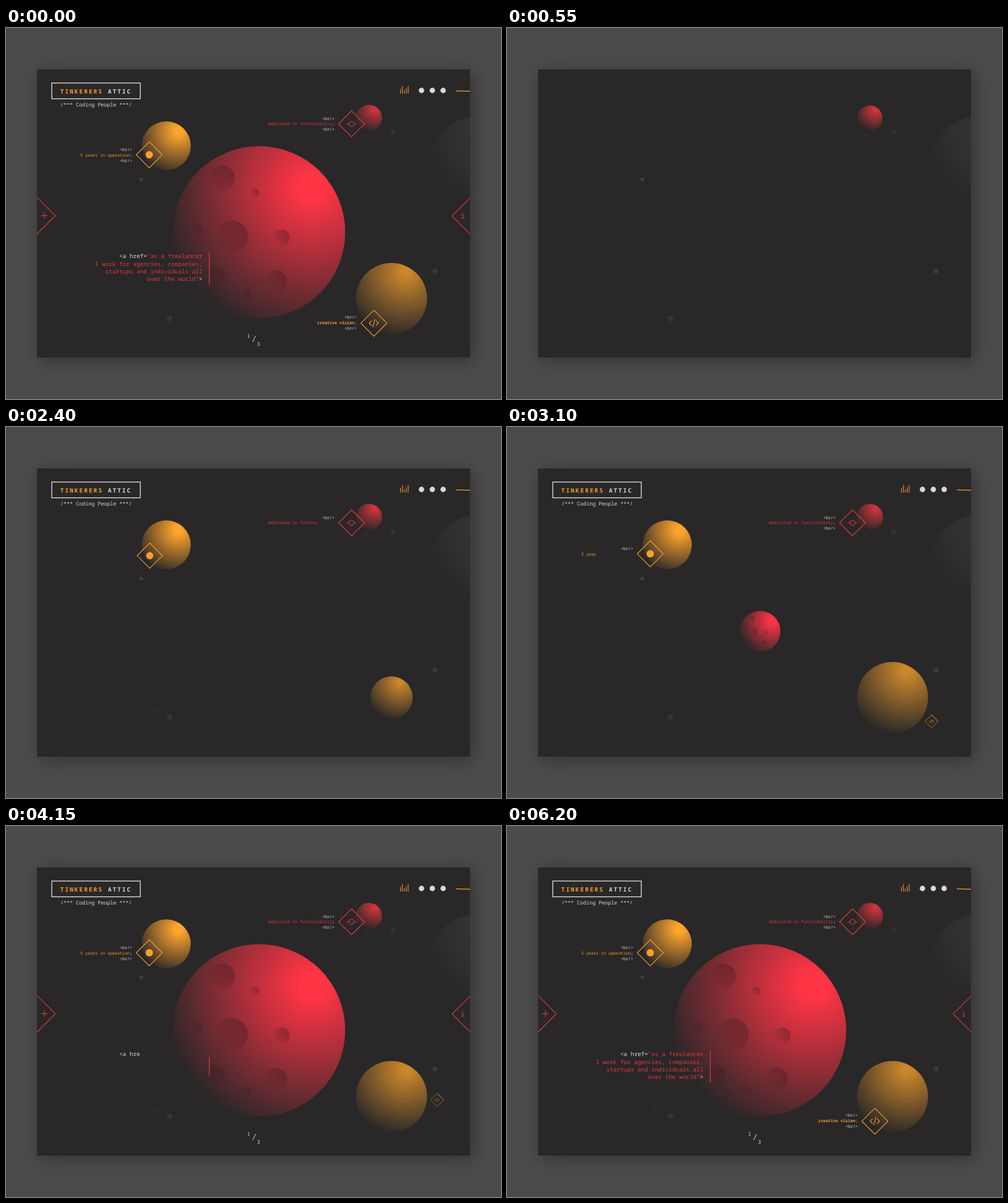
Recreate the animation shown at these times as an HTML page with a canvas. Size 800 px wide and 600 px high, loop 6.55 s.

```html
<!DOCTYPE html>
<html lang="en">
<head>
<meta charset="utf-8">
<style>
  html, body { margin: 0; width: 100%; height: 100%; overflow: hidden; background: #4c4a4b; }
  canvas { display: block; }
</style>
</head>
<body>
<canvas id="stage" width="800" height="600"></canvas>
<script>
const ctx = document.getElementById('stage').getContext('2d');
const LOOP = 6550, STEP = 50, END = 6200;
const CARD = '#292728', LIGHT = '#d9d8d8', ORANGE = '#f9a02c', RED = '#e2383f';
const MONO = '"Noto Sans Mono", "DejaVu Sans Mono", monospace';
const TAU = Math.PI * 2;

const clamp = v => Math.max(0, Math.min(1, v));
const mix = (a, b, k) => a + (b - a) * k;
const easeOut = (t, start, length, power = 3) => 1 - (1 - clamp((t - start) / length)) ** power;

function line(color, width, ...points) {
  ctx.beginPath();
  points.forEach(([x, y]) => ctx.lineTo(x, y));
  ctx.strokeStyle = color;
  ctx.lineWidth = width;
  ctx.stroke();
}

function disc(x, y, r, fill) {
  ctx.beginPath();
  ctx.arc(x, y, r, 0, TAU);
  ctx.fillStyle = fill;
  ctx.fill();
}

function text(str, x, y, size, color, weight = 400, spacing = 0) {
  ctx.font = `${weight} ${size}px ${MONO}`;
  ctx.letterSpacing = spacing + 'px';
  ctx.fillStyle = color;
  ctx.fillText(str, x, y);
}

// Types pieces [x, y, string, color, weight] one after another.
function type(t, start, perChar, size, pieces) {
  let left = Math.floor((t - start) / perChar);
  for (const [x, y, str, color, weight] of pieces) {
    if (left <= 0) return;
    text(str.slice(0, left), x, y, size, color, weight);
    left -= str.length;
  }
}

function label(t, start, right, y, str, color, weight) {
  const width = 4, x = right - (str.length + 1) * width;
  type(t, start, 25, 6.667, [
    [right - 5 * width, y - 8.7, '<br/>', LIGHT],
    [x, y, str, color, weight],
    [right - width, y, ';', LIGHT],
    [right - 5 * width, y + 8.7, '<br/>', LIGHT]
  ]);
}

// Unit sphere lit from (lx, ly), falling off into the card colour.
function planet(x, y, r, scale, color, lx, ly, from, to, details) {
  if (scale <= 0) return;
  ctx.save();
  ctx.translate(x, y);
  ctx.scale(r * scale, r * scale);
  const glow = ctx.createRadialGradient(lx, ly, from, lx, ly, to);
  glow.addColorStop(0, color);
  glow.addColorStop(1, CARD);
  disc(0, 0, 1, glow);
  if (details) {
    ctx.scale(1 / r, 1 / r);
    details();
  }
  ctx.restore();
}

function crater(x, y, r) {
  const shade = ctx.createLinearGradient(x + r * .8, y - r * .6, x - r * .75, y + r * .55);
  shade.addColorStop(0, 'rgba(60,25,32,.38)');
  shade.addColorStop(1, 'rgba(60,25,32,0)');
  disc(x, y, r, shade);
}

function craters() {
  [[-60, -87, 21], [-7, -63, 7], [-101, -4, 9], [-44, 7, 26], [36, 9, 13.5],
   [-72, 72, 16], [27, 79, 18], [-21, 100, 8]].forEach(c => crater(...c));
}

const icons = {
  commit(color, w) {
    ctx.beginPath();
    ctx.arc(0, 0, 4, 0, TAU);
    ctx.strokeStyle = color;
    ctx.lineWidth = w;
    ctx.stroke();
    line(color, w, [-8, 0], [-4, 0]);
    line(color, w, [4, 0], [8, 0]);
  },
  dot(color) { disc(0, 0, 6, color); },
  code(color, w) {
    line(color, w, [-3.5, -4], [-7.5, 0], [-3.5, 4]);
    line(color, w, [3.5, -4], [7.5, 0], [3.5, 4]);
    line(color, w, [1.8, -6.5], [-1.8, 6.5]);
  }
};

// Diamond badge at a polar position around a planet centre.
function badge(cx, cy, angle, radius, scale, alpha, color, icon) {
  if (scale <= 0) return;
  const a = angle * Math.PI / 180, w = 1.1 / Math.sqrt(scale);
  ctx.save();
  ctx.globalAlpha = alpha;
  ctx.translate(cx + radius * Math.cos(a), cy + radius * Math.sin(a));
  ctx.scale(scale, scale);
  line(color, w, [0, -21], [21, 0], [0, 21], [-21, 0], [0, -21], [21, 0]);
  icon(color, w);
  ctx.restore();
}

function spiralBadge(t, start, cx, cy, angle, radius, farRadius, color, icon) {
  const k = easeOut(t, start, 500);
  badge(cx, cy, mix(-48, angle, k), mix(farRadius, radius, k), k, .6 + .4 * k, color, icon);
}

// Circles at a small scale first, then settles in front.
function orbitBadge(t, cx, cy, color, icon) {
  const k = easeOut(t, 4150, 850, 2);
  const angle = t < 4150 ? 31.4 + (t - 3100) * .317 : mix(364.2, 485.5, k);
  const scale = t < 4150 ? .5 * easeOut(t, 2800, 250) : mix(.5, 1, k);
  const alpha = t < 4150 ? mix(.85, .65, clamp((t - 3100) / 1050)) : mix(.65, 1, k);
  badge(cx, cy, angle, mix(74, 49.1, k), scale, alpha, color, icon);
}

function backdrop() {
  const haze = ctx.createRadialGradient(800, 165, 10, 800, 165, 128);
  haze.addColorStop(0, '#383738');
  haze.addColorStop(.5, '#323132');
  haze.addColorStop(1, CARD);
  disc(762, 222, 79, haze);
  [[218, 245.5, 3.5, '#484748'], [240, 250, 2, '#383738'], [581, 175, 4, '#302e2f'],
   [624, 170, 6, '#333132'], [692.5, 394, 5, '#403f40'], [240, 460, 2.5, '#373637'],
   [263.5, 470.5, 5.5, '#3a393a']].forEach(([x, y, r, color]) =>
    planet(x, y, r, 1, color, .3, -.3, .2, 1.45));
}

function header(t) {
  const k = easeOut(t, 700, 500);
  ctx.save();
  ctx.translate(-170 * (1 - k), 0);
  ctx.strokeStyle = '#e2e1e1';
  ctx.lineWidth = 1.3;
  ctx.strokeRect(74, 89, 143, 25.5);
  text('TINKERERS', 87.7, 106, 9.5, ORANGE, 700, 2);
  text('ATTIC', 164.7, 106, 9.5, LIGHT, 600, 2);
  ctx.restore();

  ctx.save();
  ctx.translate(120 * (1 - k), 0);
  [7.5, 12, 5, 8.5, 12].forEach((h, i) =>
    line(ORANGE, 1, [637.6 + i * 3.1, 106], [637.6 + i * 3.1, 106 - h]));
  [671.5, 689, 706.5].forEach(x => disc(x, 101, 4.4, LIGHT));
  line(ORANGE, 1.2, [727, 101.7], [752, 102.4]);
  ctx.restore();

  type(t, 1290, 25, 8.37, [[88, 126.5, '/*** Coding People ***/', LIGHT]]);
}

function sideButtons(t) {
  const shift = 32 * (1 - easeOut(t, 3250, 500));
  ctx.save();
  ctx.translate(-shift, 0);
  line(RED, 1.1, [49, 273], [79.7, 303.7], [49, 334.4]);
  line(RED, 1.1, [57, 303.5], [67, 303.5]);
  line(RED, 1.1, [62, 298.5], [62, 308.5]);
  ctx.translate(2 * shift, 0);
  line(RED, 1.1, [751, 274], [721, 304], [751, 334]);
  text('i', 734.6, 307.7, 12, RED, 500);
  ctx.restore();
}

function pager(t) {
  const k = easeOut(t, 3250, 400);
  ctx.save();
  ctx.globalAlpha = k;
  ctx.translate(0, 7 * (1 - k));
  text('1', 389.4, 501, 8.4, LIGHT);
  line(LIGHT, 1, [403.5, 498], [398.5, 508]);
  text('3', 405.4, 514, 8.4, LIGHT);
  ctx.restore();
}

function quote(t) {
  const half = 26 * easeOut(t, 4020, 500, 2.9);
  if (half > 0) line(RED, 1.2, [328.5, 389 - half], [328.5, 389 + half]);
  type(t, 4030, 20, 9.333, [
    [183, 372.4, '<a href=', LIGHT],
    [227.8, 372.4, '"as a freelancer', RED],
    [143.8, 384.5, 'I work for agencies, companies,', RED],
    [160.6, 396.6, 'startups and individuals all', RED],
    [227.8, 408.7, 'over the world"', RED],
    [311.8, 408.7, '>', LIGHT]
  ]);
}

function draw(t) {
  ctx.fillStyle = '#4c4a4b';
  ctx.fillRect(0, 0, 800, 600);
  ctx.save();
  ctx.shadowColor = 'rgba(0,0,0,.32)';
  ctx.shadowBlur = 26;
  ctx.shadowOffsetX = 5;
  ctx.shadowOffsetY = 5;
  ctx.fillStyle = CARD;
  ctx.fillRect(50, 67, 700, 466);
  ctx.restore();

  ctx.save();
  ctx.beginPath();
  ctx.rect(50, 67, 700, 466);
  ctx.clip();
  ctx.textRendering = 'geometricPrecision';

  backdrop();
  planet(586.5, 145.5, 21.3, easeOut(t, 100, 700), '#cf353b', .45, -.65, .1, 1.75);
  planet(259, 190.5, 39.6, easeOut(t, 1250, 500), '#ffa52d', .5, -.6, .15, 1.85);
  planet(623, 437.5, 57.5, easeOut(t, 2270, 500), '#cb872b', .4, -.75, .1, 1.85);
  planet(409, 330.3, 139.2, easeOut(t, 3057, 500), '#ff3445', .62, -.52, .15, 1.78, craters);

  header(t);
  spiralBadge(t, 1150, 586.5, 145.5, 161.3, 29.6, 66, RED, icons.commit);
  spiralBadge(t, 2050, 259, 190.5, 152, 31.1, 60, ORANGE, icons.dot);
  orbitBadge(t, 623, 437.5, ORANGE, icons.code);
  label(t, 1770, 531, 157.2, 'dedicated to functionality', RED);
  label(t, 2820, 204, 207.9, '5 years in operation', ORANGE);
  label(t, 5050, 567, 479.1, 'creative vision', ORANGE, 700);
  sideButtons(t);
  pager(t);
  quote(t);
  ctx.restore();
}

// The loop opens on the finished picture, then cuts to the empty scene.
function tick() {
  const t = Math.floor(performance.now() % LOOP / STEP) * STEP;
  draw(t < STEP ? END : t);
  requestAnimationFrame(tick);
}
tick();
</script>
</body>
</html>
```
